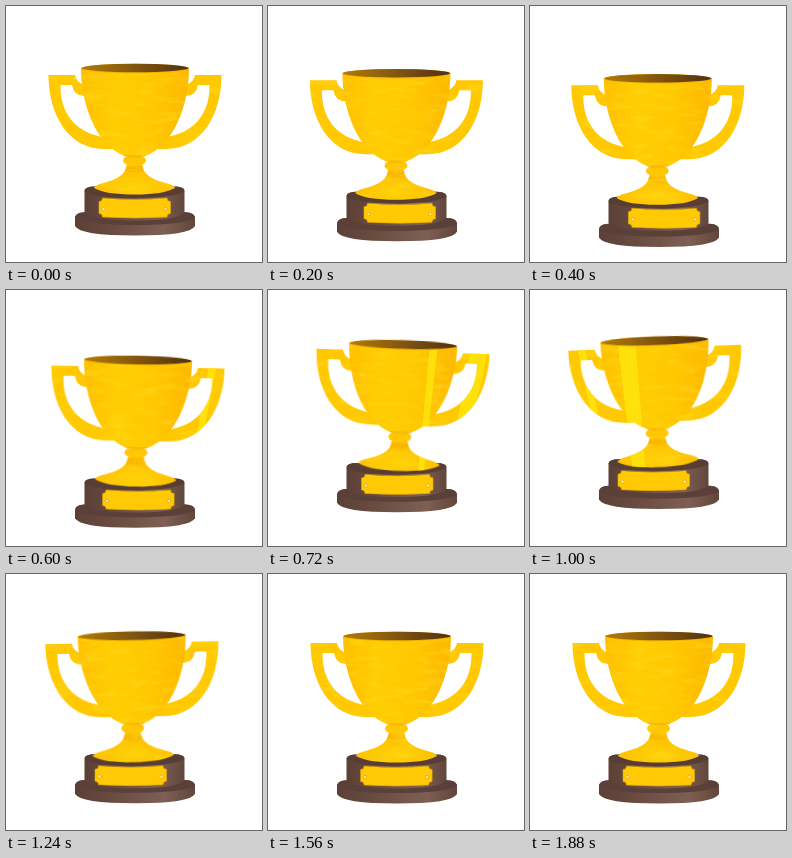
An HTML page for the animation above (1920 ms loop, 256 by 256 pixels).

```html
<!DOCTYPE html>
<html lang="en">
<head>
<meta charset="utf-8">
<title>Trophy</title>
<style>
html, body { margin: 0; width: 100%; height: 100%; overflow: hidden; background: #fff; }
svg { display: block; width: 100vw; height: 100vh; }
</style>
</head>
<body>
<svg viewBox="0 0 256 256">
  <defs>
    <linearGradient id="gold">
      <stop offset="0" stop-color="#ffc000"/>
      <stop offset=".3" stop-color="#ffcd02"/>
      <stop offset=".65" stop-color="#ffc800"/>
      <stop offset="1" stop-color="#fdb800"/>
    </linearGradient>
    <linearGradient id="inside">
      <stop offset="0" stop-color="#b17a08"/>
      <stop offset=".45" stop-color="#87590f"/>
      <stop offset="1" stop-color="#4f3114"/>
    </linearGradient>
    <linearGradient id="wood">
      <stop offset="0" stop-color="#5c4036"/>
      <stop offset=".35" stop-color="#6b4d41"/>
      <stop offset=".75" stop-color="#7d5f53"/>
      <stop offset="1" stop-color="#62463b"/>
    </linearGradient>
    <radialGradient id="foot" cx=".5" cy=".75" r=".6">
      <stop offset="0" stop-color="#ffd208"/>
      <stop offset="1" stop-color="#fdbd00"/>
    </radialGradient>
    <filter id="rough" x="-5%" y="-5%" width="110%" height="110%" color-interpolation-filters="sRGB">
      <feTurbulence class="boil" type="fractalNoise" baseFrequency=".45" numOctaves="1"/>
      <feDisplacementMap in="SourceGraphic" scale="1.2" xChannelSelector="R" yChannelSelector="G"/>
    </filter>
    <filter id="brushed" x="-5%" y="-5%" width="110%" height="110%" color-interpolation-filters="sRGB">
      <feTurbulence class="boil" type="fractalNoise" baseFrequency=".45" numOctaves="1"/>
      <feDisplacementMap in="SourceGraphic" scale="1.2" xChannelSelector="R" yChannelSelector="G" result="shape"/>
      <feTurbulence class="boil" type="fractalNoise" baseFrequency=".04 .16" numOctaves="3"/>
      <feColorMatrix values="0 0 0 0 1  0 0 0 0 .86  0 0 0 0 .12  1.4 0 0 0 -.66"/>
      <feComposite in2="shape" operator="in"/>
      <feMerge><feMergeNode in="shape"/><feMergeNode/></feMerge>
    </filter>
    <path id="bowl" d="M75 62C75 98 90 140 119 150H139C168 140 183 98 183 62Z"/>
    <path id="handle" d="M42.500 69H69Q70 76 78 79V90Q68 90 66 79H54.500C54 106 68 127 100 131.500L112 143H98C62 143 42.500 108 42.500 69Z"/>
    <path id="stem" d="M121 157H136C137 171 149 174 163 178Q169 180 169 182Q158 188.500 128.500 188.500Q99 188.500 88 182Q88 180 94 178C108 174 120 171 121 157Z"/>
    <clipPath id="inGold">
      <use href="#handle"/>
      <use href="#handle" transform="matrix(-1 0 0 1 258 0)"/>
      <use href="#bowl"/>
      <use href="#stem"/>
    </clipPath>
  </defs>

  <g id="base" filter="url(#rough)">
    <path fill="url(#wood)" d="M69 213Q69 206 82 206H176Q189 206 189 213V220Q184 229.500 129 229.500Q74 229.500 69 220Z"/>
    <path fill="#5a4038" d="M69 212Q69 206 82 206H176Q189 206 189 212Q178 219 129 219Q80 219 69 212Z"/>
  </g>
  <g id="plinth">
    <g filter="url(#rough)">
      <path fill="url(#wood)" d="M78.500 185Q78.500 180.500 89 180.500H168Q178.500 180.500 178.500 185V207Q170 214.500 128.500 214.500Q87 214.500 78.500 207Z"/>
      <path fill="#573d34" d="M78.500 185Q78.500 180.500 89 180.500H168Q178.500 180.500 178.500 185Q170 192 128.500 192Q87 192 78.500 185Z"/>
    </g>
    <g id="plate">
      <path fill="#ffca04" stroke="#e5a800" stroke-width=".6"
        d="M96.500 192Q129 195 161 192Q161 195.500 164.500 195.500V207.500Q161 207.500 161 211Q129 213 96.500 211Q96.500 207.500 93 207.500V195.500Q96.500 195.500 96.500 192Z"/>
      <g fill="#fff0a8" stroke="#c9920c" stroke-width=".5">
        <circle cx="97.500" cy="203" r="1.600"/><circle cx="159.500" cy="203" r="1.600"/>
      </g>
    </g>
  </g>
  <g id="cup">
    <g filter="url(#brushed)">
      <use href="#handle" fill="#ffc800"/>
      <use href="#handle" fill="#ffc800" transform="matrix(-1 0 0 1 258 0)"/>
      <use href="#stem" fill="url(#foot)"/>
      <use href="#bowl" fill="url(#gold)"/>
      <path fill="#f0a900" opacity=".35" d="M120 160Q129 164 137 160L138 165Q129 168 119 165Z"/>
      <ellipse cx="128.500" cy="154.500" rx="11.500" ry="5.500" fill="#ffc602"/>
      <path fill="#eaa502" opacity=".4" d="M117 149H141L138 151.500H120Z"/>
    </g>
    <path id="gleam" clip-path="url(#inGold)" fill="#ffe80c" opacity=".75"/>
    <g filter="url(#rough)">
      <ellipse cx="129" cy="62.500" rx="54" ry="4.800" fill="#f6b500"/>
      <ellipse cx="129" cy="62" rx="53.500" ry="4.200" fill="url(#inside)"/>
    </g>
  </g>
</svg>
<script>
const LOOP = 1920, STEP = 40;

// time, lift, tilt, slide, turn, lag of the lowest tier
const poses = [
  [0, 0, 0, 0, 0, 0],
  [200, 5.2, 0, -.6, 3, .5],
  [400, 10.3, 0, -1.2, 5.4, 1.3],
  [520, 11.3, .2, -.6, 5.2, .8],
  [600, 8, 1, 1, 3.6, .3],
  [720, -7.6, 1.8, 2.4, .5, .3],
  [860, -19.3, .2, 1, -2.6, .3],
  [1000, -11.3, -2, -.3, -5, .8],
  [1120, -4.8, -1.6, -1, -5, .4],
  [1240, -.3, -1, -1.2, -4, 0],
  [1360, 1.2, -.3, -.7, -2.2, 0],
  [1560, 0, 0, 0, -.4, 0],
  [1720, 0, 0, 0, 0, 0],
  [LOOP, 0, 0, 0, 0, 0]
];

const $ = id => document.getElementById(id);
const set = (id, name, value) => $(id).setAttribute(name, value);
const boils = document.querySelectorAll('.boil');

// Smooth curve through the poses
function poseAt(t) {
  let i = 0;
  while (i < poses.length - 2 && t >= poses[i + 1][0]) i++;
  const a = poses[i], b = poses[i + 1];
  const before = poses[Math.max(0, i - 1)], after = poses[Math.min(poses.length - 1, i + 2)];
  const span = b[0] - a[0], u = (t - a[0]) / span;
  return a.slice(1).map((v, k) => {
    const w = b[k + 1];
    const m = (w - before[k + 1]) / (b[0] - before[0]) * span;
    const n = (after[k + 1] - v) / (after[0] - a[0]) * span;
    const u2 = u * u, u3 = u2 * u;
    return (2 * u3 - 3 * u2 + 1) * v + (u3 - 2 * u2 + u) * m + (3 * u2 - 2 * u3) * w + (u3 - u2) * n;
  });
}

// Band of light that leans towards the middle further down
function band(x, half) {
  const low = v => 129 + (v - 129) * .7;
  return `M${x - half} 55H${x + half}L${low(x + half)} 190H${low(x - half)}Z`;
}

function draw(t) {
  const [lift, tilt, slide, turn, lag] = poseAt(t);
  set('base', 'transform', `translate(0 ${lift + lag})`);
  set('plinth', 'transform', `translate(0 ${lift})`);
  set('plate', 'transform', `translate(${turn} 0)`);
  set('cup', 'transform', `translate(${slide} ${lift}) rotate(${tilt} 128.5 185)`);

  const x = 207 - (t - 720) * .38;
  set('gleam', 'd', band(x, 9) + band(x - 47, 4));
  for (const b of boils) b.setAttribute('seed', 1 + t / STEP);
}

let last = -1;
function tick() {
  const t = Math.floor(performance.now() % LOOP / STEP) * STEP;
  if (t !== last) draw(last = t);
  requestAnimationFrame(tick);
}
tick();
</script>
</body>
</html>
```
